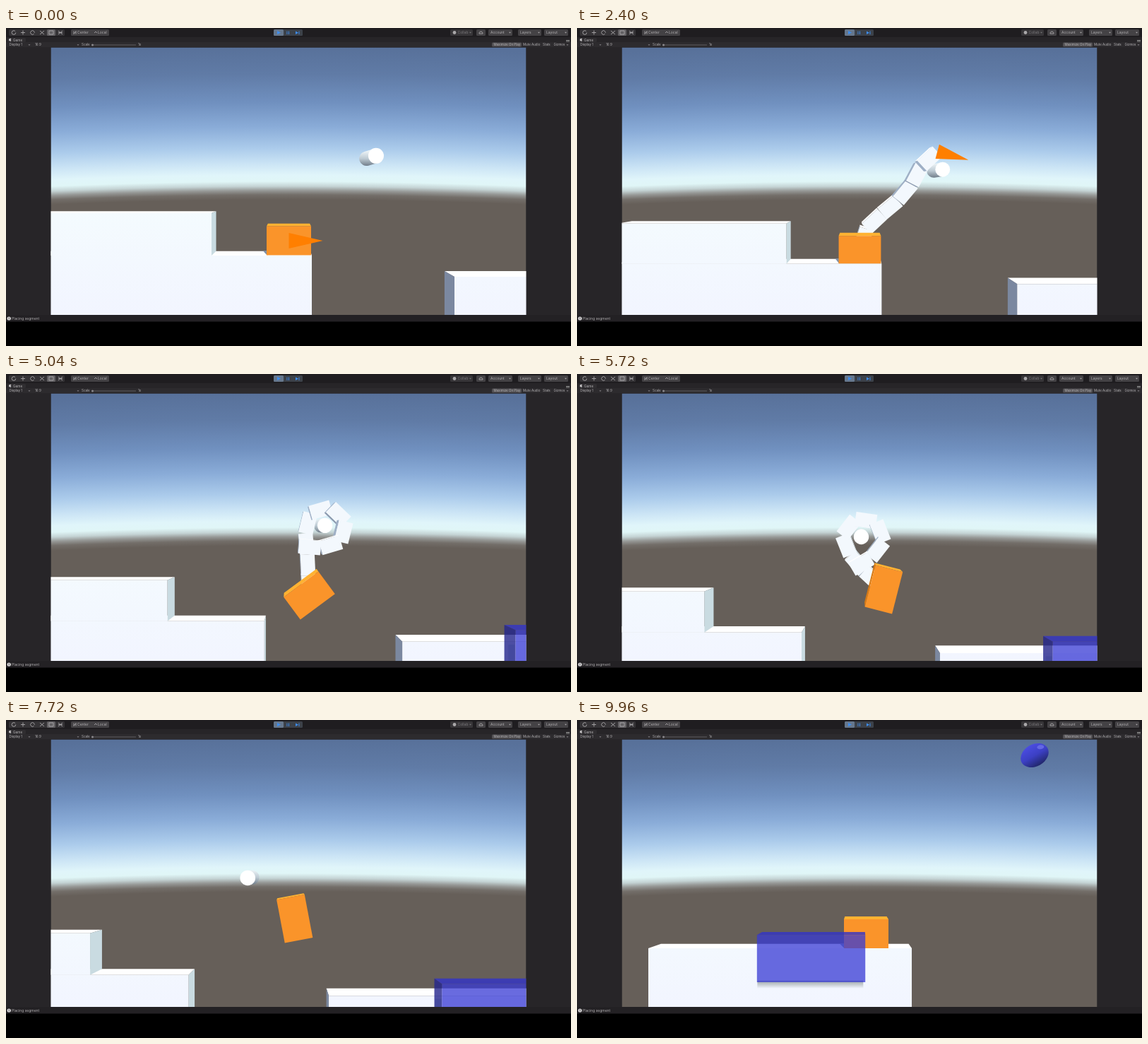
Write an HTML page with a canvas that moves like this. It is 800 by 450 pixels and loops after 10 s.

```html
<!DOCTYPE html>
<html lang="en">
<head>
<meta charset="utf-8">
<title>Segment swing</title>
<style>
html, body { margin: 0; width: 100%; height: 100%; overflow: hidden; background: #000; }
canvas { display: block; width: 800px; height: 450px; }
</style>
</head>
<body>
<canvas id="stage" width="800" height="450"></canvas>
<script>
const ctx = document.getElementById('stage').getContext('2d');
const LOOP = 10000, RAD = Math.PI / 180;
const VIEW = { x: 63.5, y: 27.5, w: 673, h: 378.5 };
const LINK = 31, RING = { x: 123, y: -32, r: 31 };
const HANG = -46.8, PULL = 4300, RELEASE = 7700;

// Each row: time, then values.
const CAMERA = [[0, 1, 0, 0], [2400, .95, 0, 17], [4200, .96, 0, 13], [5720, .97, -114, 47],
  [6720, .97, -113, 51], [7300, .975, -130, 46], [8760, 1, -360, 21], [9960, 1, -534, -29]];
const SWING = [[PULL, 168, HANG], [5000, 105, -16], [5500, 80, 17], [5720, 80, 22],
  [6720, 83, -37.7], [6950, 83, -40], [RELEASE, 82, 45]];
const FLIGHT = [[RELEASE, 181, 26, -101], [8000, 250, 0, -98], [8300, 318, 25, -94],
  [8760, 421, 101, -89], [9300, 500, 110, -30], [9700, 540, 114.5, 0], [9960, 543.5, 114.5, 0]];
const DISC = [[8300, 830, 350, 30], [8760, 729, 318, 32], [9360, 706, 190, 0], [9960, 648, 50, -30]];

// Smooth interpolation without overshoot.
function track(keys, t) {
  const last = keys.length - 1;
  if (t <= keys[0][0]) return keys[0].slice(1);
  if (t >= keys[last][0]) return keys[last].slice(1);
  const i = keys.findIndex(k => k[0] > t) - 1;
  const h = keys[i + 1][0] - keys[i][0], u = (t - keys[i][0]) / h;
  return keys[i].slice(1).map((a, n) => {
    const slope = j => (keys[j + 1][n + 1] - keys[j][n + 1]) / (keys[j + 1][0] - keys[j][0]);
    const tangent = j => {
      if (j === 0) return slope(0);
      if (j === last) return slope(last - 1);
      const p = slope(j - 1), q = slope(j);
      return p * q > 0 ? 2 * p * q / (p + q) : 0;
    };
    const b = keys[i + 1][n + 1], v = 1 - u;
    return a * (1 + 2 * u) * v * v + b * u * u * (3 - 2 * u) +
      h * (tangent(i) * u * v * v - tangent(i + 1) * u * u * v);
  });
}

function gradient(y0, y1, ...colors) {
  const g = ctx.createLinearGradient(0, y0, 0, y1);
  colors.forEach((c, i) => g.addColorStop(i / (colors.length - 1), c));
  return g;
}

const skyStops = [[27, '#58719a'], [65, '#607ba6'], [105, '#7090bf'], [140, '#8aacd8'], [170, '#abcbeb'],
  [192, '#cbe4f5'], [208, '#e0f5fa'], [217, '#e0f6f7'], [224, '#c4d3d4'], [230, '#969896'],
  [236, '#736e69'], [243, '#665f59']];
const CURVE = 8100;
const sky = ctx.createRadialGradient(400, 217 + CURVE, CURVE - 200, 400, 217 + CURVE, CURVE + 200);
skyStops.forEach(([y, c]) => sky.addColorStop((417 - y) / 400, c));

const WHITE = { front: gradient(255, 406, '#f4fbfe', '#f2f5ff'), up: '#ffffff', right: '#c9dbe1', left: '#7b88a0', down: '#8d9bb0' };
const LINKS = { ...WHITE, front: '#f3f8fd', right: '#dceaf0', left: '#9fb0c6' };
const ORANGE = { front: '#fa942a', up: '#ffb232', right: '#d48a30', left: '#d87a14', down: '#b66512' };
const BLUE = { front: 'rgba(55,58,212,.75)', up: 'rgba(50,52,200,.8)', right: 'rgba(40,42,160,.8)', left: 'rgba(35,37,140,.8)', down: 'rgba(35,37,140,.8)' };

let scale, panX, panY;
const project = ([x, y], depth = 1) =>
  [400 + (x * scale + panX) * depth, 217 + (y * scale + panY) * depth];

function polygon(points, fill) {
  ctx.beginPath();
  points.forEach(p => ctx.lineTo(...p));
  ctx.closePath();
  ctx.fillStyle = fill;
  ctx.fill();
}

// Corners run clockwise; sides facing the vanishing point are visible.
function prism(corners, paint, near = 1, far = .94) {
  const front = corners.map(c => project(c, near)), back = corners.map(c => project(c, far));
  front.forEach((a, i) => {
    const j = (i + 1) % front.length, b = front[j];
    const nx = b[1] - a[1], ny = a[0] - b[0];
    if (nx * (400 - a[0]) + ny * (217 - a[1]) <= 0) return;
    const side = Math.abs(nx) > Math.abs(ny) ? (nx > 0 ? 'right' : 'left') : (ny < 0 ? 'up' : 'down');
    polygon([a, b, back[j], back[i]], paint[side]);
  });
  polygon(front, paint.front);
}

const rect = (x0, y0, x1, y1) => [[x0, y0], [x1, y0], [x1, y1], [x0, y1]];

function turned(cx, cy, w, h, degrees) {
  const c = Math.cos(degrees * RAD), s = Math.sin(degrees * RAD);
  return rect(-w / 2, -h / 2, w / 2, h / 2).map(([x, y]) => [cx + x * c - y * s, cy + x * s + y * c]);
}

const polar = (degrees, r) => [RING.x + r * Math.cos(degrees * RAD), RING.y + r * Math.sin(degrees * RAD)];
const heading = (a, b) => Math.atan2(b[1] - a[1], b[0] - a[0]) / RAD;

const tail = [[.5, 84], [10.5, 53], [34, 31], [58, 11], [79, -14]];
const loopJoints = [0, 1, 2, 3, 4, 5].map(k => polar(197 + 60 * k, RING.r)).concat([[75, -31]]);
const joints = tail.concat(loopJoints);

function links(points) {
  for (let i = 1; i < points.length; i++) {
    const [a, b] = [points[i - 1], points[i]];
    const length = Math.hypot(b[0] - a[0], b[1] - a[1]);
    prism(turned((a[0] + b[0]) / 2, (a[1] + b[1]) / 2, length, 21, heading(a, b)), LINKS, 1, .955);
  }
}

function swingingLinks(player, phi) {
  const turn = (HANG - phi) * RAD, c = Math.cos(turn), s = Math.sin(turn);
  const ring = [tail[4], ...loopJoints].map(([x, y]) => {
    const dx = x - RING.x, dy = y - RING.y;
    return [RING.x + dx * c - dy * s, RING.y + dx * s + dy * c];
  });
  const [x, y] = ring[0], dx = player[0] - x, dy = player[1] - y, gap = Math.hypot(dx, dy);
  const rope = [player];
  for (let k = Math.ceil(gap / LINK) - 1; k > 0; k--) rope.push([x + dx * k * LINK / gap, y + dy * k * LINK / gap]);
  links(rope.concat(ring));
}

function arrow(t, placed) {
  const aim = i => i < 1 ? 0 : i >= joints.length ? -120 : heading(joints[i - 1], joints[i]);
  const from = aim(placed), to = aim(placed + 1);
  const delta = ((to - from + 540) % 360) - 180;
  const u = Math.min(1, Math.max(0, (t - 80 - placed * 345) / 260));
  const angle = (from + delta * u) * RAD, c = Math.cos(angle), s = Math.sin(angle);
  const [x, y] = joints[placed];
  polygon([[0, -11], [48, 0], [0, 11]].map(([px, py]) => project([x + px * c - py * s, y + px * s + py * c])), '#ff7f00');
}

function cylinder() {
  const front = project([120, -35], 1.033), back = project([120, -35], .92), r = 11 * scale;
  ctx.lineCap = 'round';
  ctx.lineWidth = 2 * r - 1.5;
  ctx.strokeStyle = gradient(back[1] - r, back[1] + r, '#eef5f8', '#bdcad3', '#6c7885');
  ctx.beginPath();
  ctx.moveTo(...back);
  ctx.lineTo(front[0], front[1] + .01);
  ctx.stroke();
  ctx.beginPath();
  ctx.arc(...front, r, 0, 7);
  ctx.fillStyle = '#fff';
  ctx.fill();
}

function disc(t) {
  const [x, y, angle] = track(DISC, t);
  ctx.save();
  ctx.translate(x, y);
  ctx.rotate(angle * RAD);
  ctx.beginPath();
  ctx.ellipse(0, 0, 21, 15.5, 0, 0, 7);
  ctx.fillStyle = gradient(-15, 15, '#4a4ce0', '#3c40c4', '#22286e');
  ctx.fill();
  ctx.beginPath();
  ctx.ellipse(13, -6, 5, 3, .4, 0, 7);
  ctx.fillStyle = '#6468e4';
  ctx.fill();
  ctx.restore();
}

function scene(t) {
  [scale, panX, panY] = track(CAMERA, t);
  ctx.save();
  ctx.beginPath();
  ctx.rect(VIEW.x, VIEW.y, VIEW.w, VIEW.h);
  ctx.clip();
  ctx.fillStyle = sky;
  ctx.fillRect(VIEW.x, VIEW.y, VIEW.w, VIEW.h);

  let player, spin = 0, phi = HANG;
  if (t < PULL) player = tail[0];
  else if (t < RELEASE) {
    let r;
    [r, phi] = track(SWING, t);
    player = polar(90 - phi, r);
    spin = (HANG - phi) * 1.1;
  } else {
    const [x, y, turn] = track(FLIGHT, t);
    player = [x, y];
    spin = turn;
  }

  prism(rect(235, 135, 608, 500), WHITE);
  prism(rect(-361, 105, 33, 500), WHITE);
  prism(rect(-361, 45, -109, 105), WHITE);
  if (spin === 0) {
    const ground = player[1] + 20.5, edge = player[0] - 31;
    polygon([project([edge, ground]), project([edge, ground], .94), project([edge - 8, ground], .94)], '#7f8fa6');
  }
  const shade = Math.max(0, Math.min(9, (panX + 534) / 17));
  polygon(rect(393 - shade, 136, 393, 500).map(p => project(p, 1.02)), '#cbdde5');
  const [sx, sy] = project([393, 177], 1.026);
  ctx.fillStyle = gradient(sy, sy + 11, '#9aa3a4', '#f2f5ff');
  ctx.fillRect(sx, sy, 150 * scale, 11);

  cylinder();
  const placed = Math.max(0, Math.min(joints.length - 1, Math.floor((t - 80) / 345)));
  if (t < PULL) links(joints.slice(0, placed + 1));
  else if (t < RELEASE) swingingLinks(player, phi);
  prism(turned(...player, 63, 41, spin), ORANGE);
  if (t < PULL) arrow(t, placed);
  prism(rect(392.5, 114, 542, 179), BLUE, 1.026, .975);
  disc(t);
  ctx.restore();
}

function label(text, x, y, size = 5, color = '#b4b2b4') {
  ctx.font = `${size}px Inter, sans-serif`;
  ctx.fillStyle = color;
  ctx.fillText(text, x, y);
}

function box(x, y, w, h, fill) {
  ctx.fillStyle = fill;
  ctx.beginPath();
  ctx.roundRect(x, y, w, h, 1.5);
  ctx.fill();
}

function lines(color, ...paths) {
  ctx.strokeStyle = color;
  ctx.lineWidth = .9;
  ctx.lineCap = 'butt';
  ctx.beginPath();
  paths.forEach(p => {
    ctx.moveTo(p[0], p[1]);
    for (let i = 2; i < p.length; i += 2) ctx.lineTo(p[i], p[i + 1]);
  });
  ctx.stroke();
}

function chrome() {
  ctx.fillStyle = '#272528';
  ctx.fillRect(0, 0, 800, 416);
  ctx.fillStyle = '#1f1d20';
  ctx.fillRect(0, 0, 800, 13);
  ctx.fillStyle = '#2d2b2e';
  ctx.fillRect(0, 20, 800, 7);
  ctx.fillStyle = '#232124';
  ctx.fillRect(0, 406, 800, 9.5);
  ctx.fillStyle = '#000';
  ctx.fillRect(0, 415.5, 800, 34.5);

  const icon = '#aaa8aa';
  box(4, 2, 79, 9, '#353336');
  box(58, 2, 12, 9, '#626063');
  ctx.strokeStyle = icon;
  ctx.lineWidth = .9;
  for (const [x, start] of [[11, 0], [37.5, .8]]) {
    ctx.beginPath();
    ctx.arc(x, 6.5, 2.8, start, start + 5.6);
    ctx.stroke();
  }
  lines(icon, [21, 6.5, 27, 6.5], [24, 3.5, 24, 9.5], [48, 4, 54, 9], [54, 4, 48, 9],
    [61, 4, 67, 4, 67, 9, 61, 9, 61, 4], [74, 4, 80, 9], [80, 4, 74, 9], [74, 6.5, 80, 6.5]);

  box(92, 2, 54, 9, '#434144');
  lines(icon, [96, 4.5, 96, 8.5, 99, 4.5, 99, 8.5], [125, 7, 127, 5, 129, 7]);
  label('Center', 101, 8.3);
  label('Local', 130, 8.3);

  box(379, 2, 41, 9, '#3c4149');
  box(379, 2, 14, 9, '#66778d');
  polygon([[384, 4], [389, 6.5], [384, 9]], '#3d8df0');
  lines('#3d8df0', [398, 4.5, 398, 9], [400.5, 4.5, 400.5, 9], [415, 4.5, 415, 9]);
  polygon([[410, 4.5], [414, 6.7], [410, 9]], '#3d8df0');

  box(629, 2, 32, 9, '#373538');
  box(666, 2, 13, 9, '#444245');
  for (const [x, w, text] of [[683, 34, 'Account'], [725, 33, 'Layers'], [762, 34, 'Layout']]) {
    box(x, 2, w, 9, '#444245');
    label(text, x + 3, 8.3);
    polygon([[x + w - 5, 5.7], [x + w - 2, 5.7], [x + w - 3.5, 7.5]], icon);
  }
  ctx.fillStyle = icon;
  ctx.beginPath();
  ctx.arc(635, 6.5, 2.4, 0, 7);
  ctx.fill();
  label('Collab', 639.5, 8.3, 5, '#7b797c');
  polygon([[656, 5.7], [659, 5.7], [657.5, 7.5]], '#777');
  lines(icon, [670, 8, 670, 6.5, 672, 5, 674, 5.5, 675, 7, 675, 8, 670, 8]);

  box(2, 14, 26, 6, '#302e31');
  ctx.fillStyle = '#d0ced0';
  ctx.beginPath();
  ctx.arc(6, 16.7, 1.9, .6, 5.7);
  ctx.lineTo(6, 16.7);
  ctx.fill();
  label('Game', 10, 18.5, 4.8);
  lines('#999', [793, 17.5, 798, 17.5], [793, 19, 798, 19]);
  box(688, 20.5, 42, 6, '#535154');
  for (const [text, x] of [['Display 1', 4.5], ['16:9', 41], ['Scale', 107], ['1x', 187],
    ['Maximize On Play', 690.5], ['Mute Audio', 732], ['Stats', 760], ['Gizmos', 775.5]]) label(text, x, 25, 4.5);
  lines('#838184', [32, 23, 33, 24.5, 34, 23], [101, 23, 102, 24.5, 103, 23], [794, 23, 795, 24.5, 796, 23]);
  lines('#656366', [121, 24, 184, 24]);
  box(121, 22.5, 3, 3, '#8c8a8d');

  ctx.fillStyle = '#e8e6e8';
  ctx.beginPath();
  ctx.arc(4.2, 411, 2.6, 0, 7);
  ctx.fill();
  lines('#333', [4.2, 409.3, 4.2, 412.5]);
  label('Placing segment', 8, 413, 5, '#b0aeb0');
}

function frame(now) {
  chrome();
  scene(now % LOOP);
  requestAnimationFrame(frame);
}
requestAnimationFrame(frame);
</script>
</body>
</html>
```
